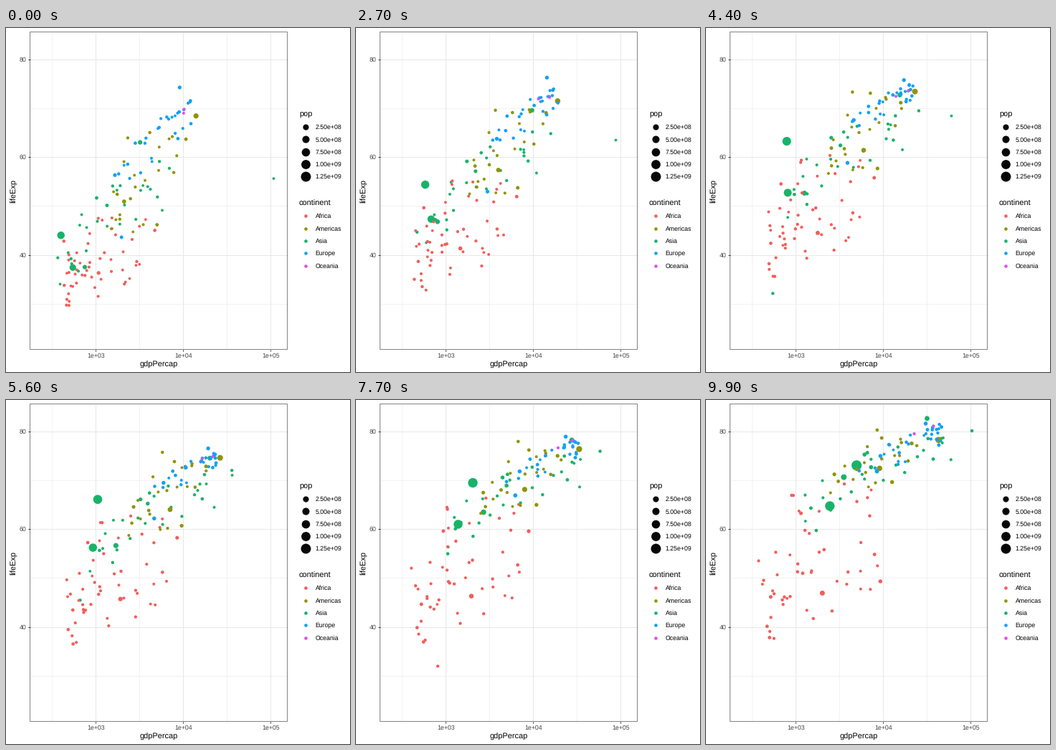
Write a matplotlib script that moves like this. It is 480 px wide and 480 px high and loops after 10 s.

```python
import numpy as np
import matplotlib.pyplot as plt
from matplotlib.animation import FuncAnimation
from matplotlib.patches import Rectangle

SIZE, FRAMES, INTERVAL = 480, 100, 100
LEFT, RIGHT, TOP, BOTTOM = 33.5, 392.5, 5.6, 448.6
X_MIN, X_MAX, Y_MIN, Y_MAX = 2.2487, 5.1888, 20.649, 85.553
COLORS = {"Africa": "#f35e5a", "Americas": "#929304", "Asia": "#18b369",
          "Europe": "#12a1f4", "Oceania": "#df4ff0"}
YEARS = np.arange(1952, 2008, 5)
PROGRESS = np.linspace(0, 1, len(YEARS))


def keyed(values):
    """Spread a few keys evenly over the loop."""
    return np.interp(PROGRESS, np.linspace(0, 1, len(values)), values)


def dot_size(pop):
    """Size 1 to 6, area proportional to population in millions."""
    return 1 + 5 * np.sqrt(np.asarray(pop) / 1319)


def area(size):
    return (2.134 * np.asarray(size) + 1.41) ** 2


def px(log_gdp):
    return LEFT + (log_gdp - X_MIN) / (X_MAX - X_MIN) * (RIGHT - LEFT)


def py(life):
    return BOTTOM - (life - Y_MIN) / (Y_MAX - Y_MIN) * (BOTTOM - TOP)


def track(pop, gdp, life, dip_year=0, depth=0):
    """A single dot led by keys, with an optional short fall in life."""
    dip = depth * np.clip(1 - abs(YEARS - dip_year) / 8, 0, 1)
    return keyed(np.log10(gdp)), keyed(life) - dip, keyed(dot_size(pop))


def cloud(rng, n, gdp, gdp_sd, life, life_sd, corr, skew, pop):
    """Dots spread around a moving mean, each keeping roughly its rank."""
    z = np.linspace(-1.7, 1.7, n)
    rank = z + skew * (z * z - 1) + rng.normal(0, .1, n)
    drift = rng.normal(0, .35, n)
    rest = np.clip(rng.normal(0, 1, n), -1.9, 1.9) * np.sqrt(1 - corr ** 2)
    scale = np.exp(rng.normal(0, .9, n))
    dots = []
    for r, d, e, k in zip(rank, drift, rest, scale):
        u = r + d * PROGRESS
        x = keyed(gdp) + keyed(gdp_sd) * u + rng.normal(0, .018, len(YEARS))
        y = keyed(life) + keyed(life_sd) * (corr * u + e)
        y += rng.normal(0, .3, len(YEARS))
        dots.append((x, np.minimum(y, 82), keyed(dot_size(k * np.array(pop)))))
    return dots


def build():
    rng = np.random.default_rng(52)
    groups = {
        "Asia": [
            track((556, 1319), (400, 560, 870, 1800, 4959),
                  (44, 57, 65, 69, 73), 1962, 9),
            track((372, 1110), (547, 715, 1040, 2452), (37.4, 49.5, 59.1, 64.7)),
            track((86, 127), (3217, 9100, 18000, 27400, 31656), (63, 71, 76, 82.6)),
            track((82, 223), (750, 760, 1450, 2650, 3541), (37.5, 54.5, 70.6)),
            track((1, 2), (1.08e5, 96e3, 75e3, 29500, 35e3, 47307), (55.6, 70, 77.6)),
            track((5, 14), (368, 575, 1714), (39.4, 49, 59.7), 1977, 17),
            *cloud(rng, 27, (3.2, 3.62, 3.9), (.36, .47), (48, 61.5, 71.5),
                   (8, 5.5), .65, .05, (4, 11)),
        ],
        "Africa": [
            track((33, 135), (1077, 1900, 2014), (36.3, 45.5, 46.9)),
            track((14, 44), (4725, 8400, 9270), (45, 51.4, 57, 61.6, 49.3)),
            track((3, 9), (493, 750, 863), (40, 45, 46.2), 1992, 21),
            *cloud(rng, 49, (3, 3.14, 3.18), (.27, .4), (39.3, 50.3, 54.8),
                   (4.5, 8), .4, .22, (3, 9)),
        ],
        "Americas": [
            track((157, 301), (13990, 24500, 42952), (68.4, 74, 78.2)),
            track((56, 190), (2109, 6800, 9066), (50.9, 62.7, 72.4)),
            *cloud(rng, 23, (3.52, 3.77, 3.89), (.25, .27), (54.8, 66, 73.6),
                   (8, 4), .6, .15, (4, 9)),
        ],
        "Europe": [
            track((22, 71), (1970, 4250, 8458), (43.6, 60.7, 71.8)),
            *cloud(rng, 29, (3.74, 4.03, 4.16, 4.35), (.25, .21, .26),
                   (65.2, 70.6, 73.8, 77.8), (5, 2.1, 2.8), .85, -.24, (8, 11)),
        ],
        "Oceania": cloud(rng, 2, (4.01, 4.24, 4.47), (.01, .06),
                         (69.2, 73.7, 80.7), (.1, .4), .9, 0, (5, 12)),
    }
    colors = [COLORS[name] for name, dots in groups.items() for _ in dots]
    return np.array([dot for dots in groups.values() for dot in dots]), colors


plt.rcParams.update({"font.family": "Liberation Sans", "text.hinting": "none"})
fig = plt.figure(figsize=(SIZE / 72, SIZE / 72), dpi=72, facecolor="white")
ax = fig.add_axes([0, 0, 1, 1])
ax.set(xlim=(0, SIZE), ylim=(SIZE, 0))
ax.axis("off")


def line(xs, ys, color="#e8e8e8", width=1.07):
    ax.plot(xs, ys, color=color, lw=width, zorder=1, solid_capstyle="butt")


def label(x, y, text, size=8.8, color="black", **kw):
    ax.text(x, y, text, fontsize=size, color=color, va="baseline", **kw)


def legend_key(y, size, color, text):
    ax.scatter(417.6, y, s=area(size), color=color, lw=0)
    label(431.6, y + 3, text)


for v in (2.5, 3.5, 4.5):
    line([px(v)] * 2, [TOP, BOTTOM], width=.55)
for v in (30, 50, 70):
    line([LEFT, RIGHT], [py(v)] * 2, width=.55)
for v in (3, 4, 5):
    line([px(v)] * 2, [TOP, BOTTOM])
    line([px(v)] * 2, [BOTTOM, BOTTOM + 2.75], "#333333")
    label(px(v), 460.4, f"1e+0{v}", color="#444444", ha="center")
for v in (40, 60, 80):
    line([LEFT, RIGHT], [py(v)] * 2)
    line([LEFT - 2.75, LEFT], [py(v)] * 2, "#333333")
    label(28.6, py(v) + 3.2, str(v), color="#444444", ha="right")
ax.add_patch(Rectangle((33.5, 5.5), 359, 443, fill=False, ec="#333333",
                       lw=.6, zorder=4, snap=False))

label(213, 473, "gdpPercap", 11, ha="center")
label(14, 227.6, "lifeExp", 11, ha="center", rotation=90, rotation_mode="anchor")
label(409, 123.5, "pop", 11)
label(409, 248, "continent", 11)
for i in range(5):
    pop = 250 * (i + 1)
    legend_key(138.2 + 17.28 * i, dot_size(pop), "#080808", f"{pop * 1e6:.2e}")
for i, (name, color) in enumerate(COLORS.items()):
    legend_key(262.4 + 17.28 * i, 1.5, color, name)

data, colors = build()
dots = ax.scatter(px(data[:, 0, 0]), py(data[:, 1, 0]), c=colors, lw=0, zorder=3)


def update(frame):
    pos = frame / (FRAMES - 1) * (len(YEARS) - 1)
    k = min(int(pos), len(YEARS) - 2)
    x, y, size = (data[:, :, k] + (data[:, :, k + 1] - data[:, :, k]) * (pos - k)).T
    dots.set_offsets(np.column_stack([px(x), py(y)]))
    dots.set_sizes(area(size))
    return dots,


anim = FuncAnimation(fig, update, frames=FRAMES, interval=INTERVAL,
                     repeat=True, repeat_delay=0, blit=False)
plt.show()
```
